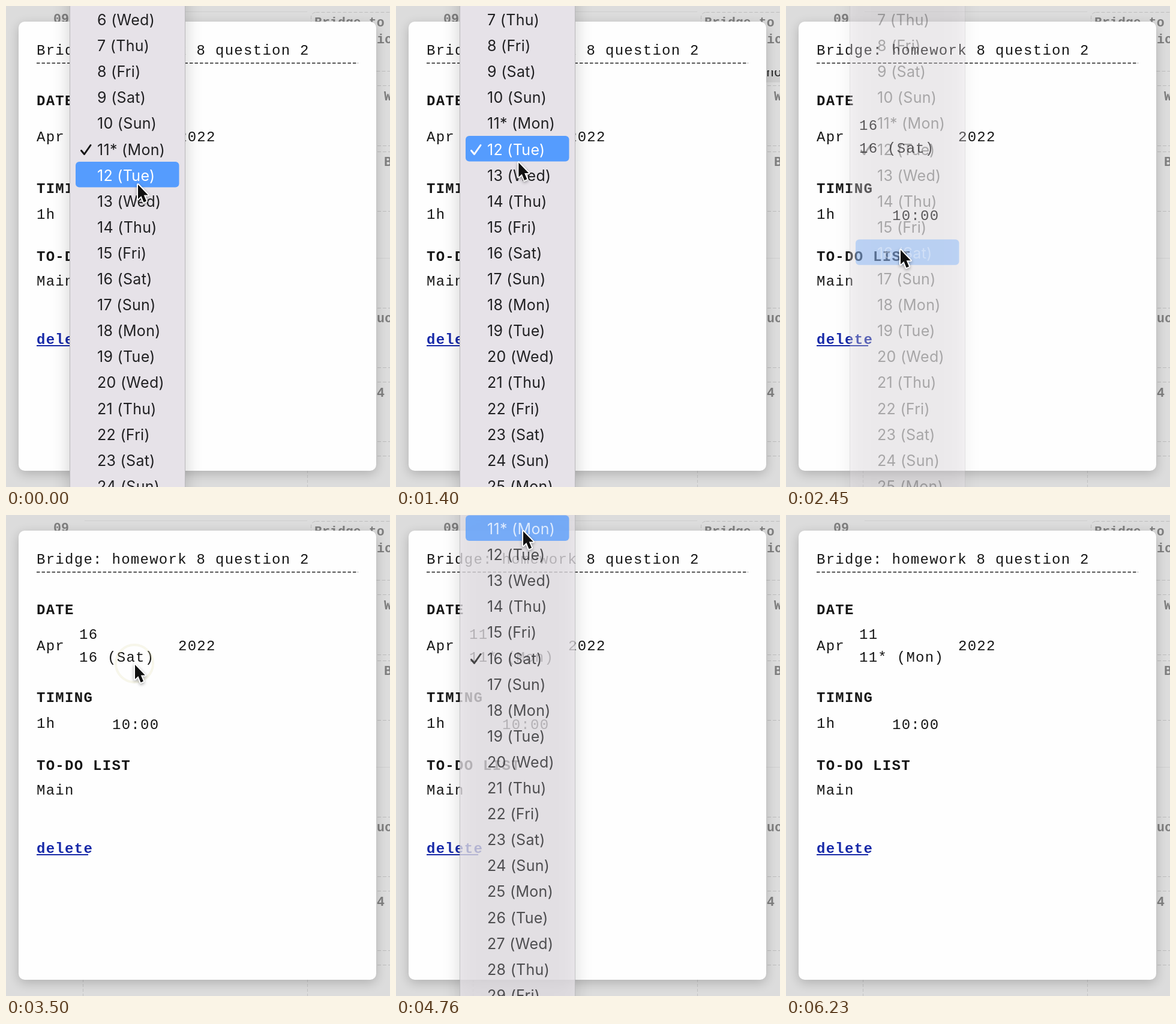
Recreate the animation shown at these times as an HTML page with a canvas. Size 640 by 800 pixels, loop 6300 ms.

```html
<!DOCTYPE html>
<html lang="en">
<head>
<meta charset="utf-8">
<title>Date picker</title>
<style>
html, body { margin: 0; width: 100%; height: 100%; overflow: hidden; background: #dbdbdb; }
canvas { display: block; width: 640px; height: 800px; }
</style>
</head>
<body>
<canvas id="stage" width="640" height="800"></canvas>
<script>
const ctx = document.getElementById('stage').getContext('2d');
const LOOP = 6300, STEP = 70;
const MONO = '"Liberation Mono", "Courier New", monospace';
const SANS = 'Inter, "Liberation Sans", sans-serif';
const DAYS = ['Sun', 'Mon', 'Tue', 'Wed', 'Thu', 'Fri', 'Sat'];
const ROW = 43.1, ROW_Y = 238.5;

// Each menu: day ticked, opening time, click time, day chosen
const MENUS = [
  { day: 11, open: -1, click: 190, pick: 12 },
  { day: 12, open: 1250, click: 2220, pick: 16 },
  { day: 16, open: 3570, click: 4620, pick: 11 }
];
const HOLD = 90, FADE = 210;
const CLICKS = [190, 1180, 2220, 3500, 4620];

// Pointer path: time, x, y
const PATH = [
  [0, 219, 295], [220, 219, 296], [480, 231, 298], [860, 231, 298],
  [1150, 206, 240], [1290, 205, 241], [1830, 190, 403], [2840, 190, 404],
  [3290, 214, 247], [3700, 214, 247], [4400, 211, 25], [4800, 211, 25],
  [5250, 384, 347], [5770, 384, 347], [6160, 560, 812], [6300, 560, 812]
];

const ease = u => u * u * (3 - 2 * u);
const label = d => `${d}${d === 11 ? '*' : ''} (${DAYS[(d + 4) % 7]})`;

function pointerAt(t) {
  const i = PATH.findIndex((p, k) => k && t <= p[0]);
  const [t0, x0, y0] = PATH[i - 1], [t1, x1, y1] = PATH[i];
  const u = ease((t - t0) / (t1 - t0));
  return { x: x0 + (x1 - x0) * u, y: y0 + (y1 - y0) * u };
}

function text(str, x, y, font, color, spacing = 0) {
  ctx.font = font;
  ctx.fillStyle = color;
  ctx.letterSpacing = spacing + 'px';
  ctx.fillText(str, x, y);
  ctx.letterSpacing = '0px';
}

const mono = (str, x, y, bold, color = '#161616') =>
  text(str, x, y, `${bold ? 'bold ' : ''}24px ${MONO}`, color, 1.28);
const faint = (str, x, y) => text(str, x, y, `bold 21.6px ${MONO}`, '#7e7e7e');

function line(x0, y0, x1, y1, color, dash = [], width = 1) {
  ctx.strokeStyle = color;
  ctx.lineWidth = width;
  ctx.setLineDash(dash);
  ctx.beginPath();
  ctx.moveTo(x0, y0);
  ctx.lineTo(x1, y1);
  ctx.stroke();
  ctx.setLineDash([]);
}

function box(x, y, w, h, r, color) {
  ctx.fillStyle = color;
  ctx.beginPath();
  ctx.roundRect(x, y, w, h, r);
  ctx.fill();
}

function shadow(color, blur, dy = 0) {
  ctx.shadowColor = color;
  ctx.shadowBlur = blur;
  ctx.shadowOffsetY = dy;
}

function drawCalendar(day) {
  ctx.fillStyle = '#dcdcdc';
  ctx.fillRect(0, 0, 640, 800);
  line(131, 9.5, 502, 9.5, '#cfcfcf');
  line(128.5, 772, 128.5, 800, '#c3c3c3', [5, 3]);
  line(502.5, 772, 502.5, 800, '#c3c3c3', [5, 3]);
  ctx.strokeStyle = '#bdbdbd';
  ctx.setLineDash([6, 3]);
  ctx.beginPath();
  ctx.roundRect(508.5, 10.5, 160, 98, 8);
  ctx.stroke();
  ctx.setLineDash([]);
  for (const y of [132, 232, 242, 341, 502, 601, 625, 724, 748])
    line(610, y + .5, 640, y + .5, '#bdbdbd', [6, 3]);
  line(610, 419.5, 640, 419.5, '#cfcfcf');
  faint('09', 79, 28);
  faint('Bridge to', 514, 34);
  faint('ic', 618, 62);
  faint('W', 630, 157);
  faint('B', 630, 266);
  faint('uc', 618, 526);
  faint('4', 618, 650);
  if (day === 12) {
    ctx.save();
    ctx.beginPath();
    ctx.rect(600, 107, 40, 25);
    ctx.clip();
    ctx.fillStyle = '#cecece';
    ctx.fillRect(600, 109, 40, 18);
    text('ho', 617, 117, `21.6px ${MONO}`, '#222');
    ctx.restore();
  }
}

function drawCard(day) {
  shadow('rgba(0,0,0,.2)', 18, 5);
  box(21, 26, 596, 747, 10, '#fefefe');
  shadow('transparent', 0);
  mono('Bridge: homework 8 question 2', 51, 81);
  line(51, 95, 587, 95, '#222', [5.5, 3], 1.6);
  mono('DATE', 51, 165, true);
  mono('Apr', 51, 225);
  mono(String(day), 122, 206);
  mono(label(day), 122, 244);
  mono('2022', 287, 225);
  mono('TIMING', 51, 311, true);
  mono('1h', 51, 354);
  mono('10:00', 177, 356);
  mono('TO-DO LIST', 51, 424, true);
  mono('Main', 51, 465);
  mono('delete', 51, 562, true, '#1729a8');
  line(51, 565, 137, 565, '#1729a8', [], 2);
}

function drawMenu(menu, t, p) {
  const alpha = 1 - Math.max(0, (t - menu.click - HOLD) / FADE);
  const blink = t > menu.click && t < menu.click + 60;
  const inside = p.x > 107 && p.x < 298;
  const hover = t > menu.click ? menu.pick
    : inside ? menu.day + Math.round((p.y - ROW_Y) / ROW) : 0;
  ctx.save();
  ctx.globalAlpha = alpha;
  shadow('rgba(0,0,0,.2)', 28, 0);
  ctx.fillStyle = '#e6e2e8';
  ctx.fillRect(107, -40, 191, 880);
  shadow('transparent', 0);
  line(106.5, 0, 106.5, 800, '#b9b8bb');
  line(298.5, 0, 298.5, 800, '#b9b8bb');
  for (let d = 1; d <= 30; d++) {
    const y = ROW_Y + (d - menu.day) * ROW;
    if (y < -30 || y > 830) continue;
    const lit = d === hover && !blink;
    if (lit) box(116, y - 22.6, 172.5, 42.5, 6, '#559cfe');
    text(label(d), 152, y + 9, `25px ${SANS}`, lit ? '#fff' : '#202022', .3);
    if (d === menu.day) {
      ctx.strokeStyle = lit ? '#fff' : '#161616';
      ctx.lineWidth = 3;
      ctx.lineCap = ctx.lineJoin = 'round';
      ctx.beginPath();
      ctx.moveTo(125.5, y + 2);
      ctx.lineTo(130.5, y + 8);
      ctx.lineTo(141, y - 7);
      ctx.stroke();
      ctx.lineCap = 'butt';
    }
  }
  ctx.restore();
}

function drawRing(t, p) {
  for (const c of CLICKS) {
    const u = (t - c + 70) / 210;
    if (u <= 0 || u >= 1) continue;
    ctx.strokeStyle = `rgba(225,218,175,${.3 * Math.sin(Math.PI * u)})`;
    ctx.lineWidth = 4;
    ctx.beginPath();
    ctx.arc(p.x, p.y, 31, 0, 2 * Math.PI);
    ctx.stroke();
  }
}

function drawPointer({ x, y }) {
  const shape = new Path2D('M0 0V24L5.4 19L9.6 29.5L14 27.6L9.8 17.6H16.8Z');
  ctx.save();
  ctx.translate(x + 1, y + 2);
  ctx.lineJoin = 'round';
  ctx.lineWidth = 4;
  ctx.strokeStyle = '#fff';
  shadow('rgba(0,0,0,.35)', 5, 2);
  ctx.stroke(shape);
  shadow('transparent', 0);
  ctx.fillStyle = '#111';
  ctx.fill(shape);
  ctx.restore();
}

function draw(now) {
  const t = Math.floor((now % LOOP) / STEP) * STEP;
  const p = pointerAt(t);
  const day = MENUS.reduce((d, m) => t >= m.click + HOLD ? m.pick : d, 11);
  const menu = MENUS.find(m => t >= m.open && t < m.click + HOLD + FADE);
  drawCalendar(day);
  drawCard(day);
  if (menu) drawMenu(menu, t, p);
  drawRing(t, p);
  drawPointer(p);
}

const start = performance.now();
function frame() {
  draw(performance.now() - start);
  requestAnimationFrame(frame);
}
frame();
</script>
</body>
</html>
```
